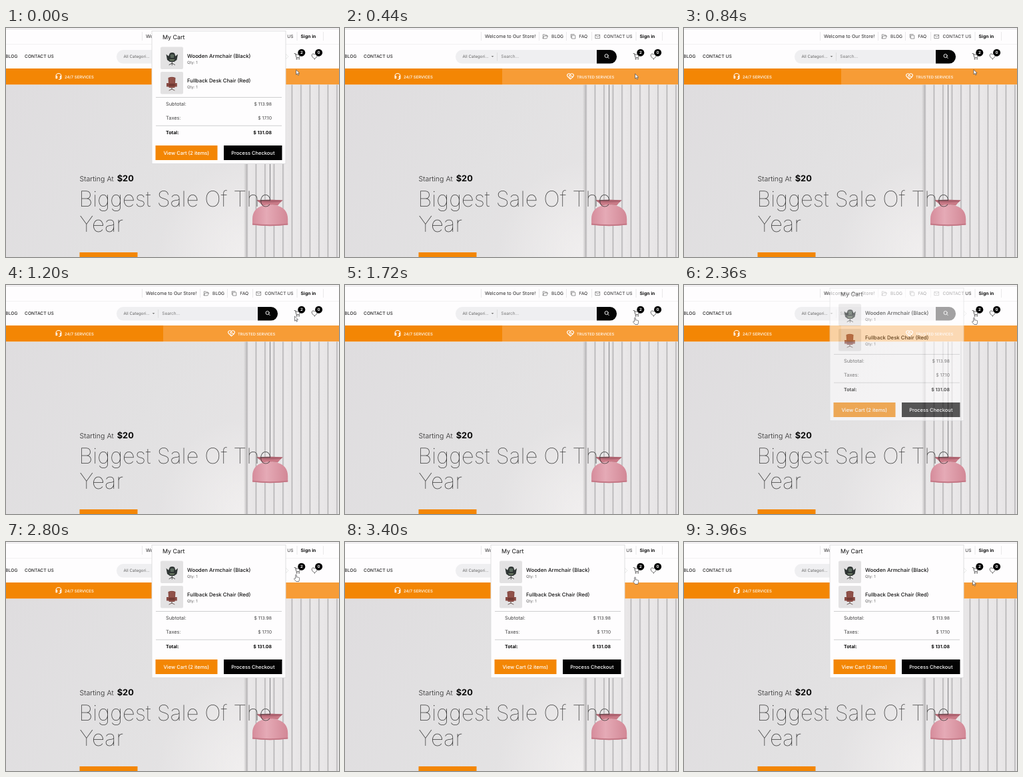
Animation, 500 px wide and 345 px high, one loop 4 s. Source, as an HTML page:

```html
<!DOCTYPE html>
<html lang="en">
<head>
<meta charset="utf-8">
<title>Store cart</title>
<style>
html, body { margin: 0; width: 100%; height: 100%; overflow: hidden; background: #fff; }
svg { display: block; width: 100vw; height: 100vh; }
text { font-family: Inter, "Open Sans", sans-serif; text-rendering: geometricPrecision; white-space: pre; }
.line { fill: none; stroke-linecap: round; stroke-linejoin: round; }
</style>
</head>
<body>
<svg id="stage" viewBox="0 0 500 345">
  <defs>
    <linearGradient id="wall" x2="1" y2=".25">
      <stop offset="0" stop-color="#dfdddf"/><stop offset=".5" stop-color="#e2e1e2"/><stop offset="1" stop-color="#e7e5e6"/>
    </linearGradient>
    <radialGradient id="glow" cx="1" cy="1" r="1">
      <stop offset="0" stop-color="#f1efef"/><stop offset="1" stop-color="#f1efef" stop-opacity="0"/>
    </radialGradient>
    <linearGradient id="slat">
      <stop offset="0" stop-color="#d9d7d8"/><stop offset=".25" stop-color="#eae8e9"/><stop offset="1" stop-color="#e6e4e5"/>
    </linearGradient>
    <linearGradient id="edge">
      <stop offset="0" stop-color="#bbb9ba" stop-opacity="0"/><stop offset="1" stop-color="#bbb9ba"/>
    </linearGradient>
    <linearGradient id="shade">
      <stop offset="0" stop-color="#d58c9b"/><stop offset=".4" stop-color="#e5aab6"/><stop offset="1" stop-color="#d28896"/>
    </linearGradient>
  </defs>

  <g id="page">
    <rect width="500" height="62" fill="#fefdfe"/>
    <path d="M0 1.5H500" stroke="#e2dfe2"/>
    <path d="M0 24.5H500" stroke="#f2f1f2"/>
    <path d="M204.5 6V19M291.5 6V19M332.5 6V19M370.5 6V19M437 6V19M476.5 6V19" stroke="#e4e3e5" stroke-width=".8"/>
    <g class="line" stroke="#555" stroke-width=".6">
      <path d="M297.3 15.5V9.8H299.8L300.7 10.8H303.2V12M297.3 15.5L298.9 12H304.6L303 15.5Z"/>
      <path d="M340.8 11.2H345.8V16H340.8ZM339.2 14.4V9.6H344.2"/>
      <path d="M376.2 10.2H382.6V15.6H376.2ZM376.2 10.8L379.4 13.4 382.6 10.8"/>
    </g>

    <rect x="166" y="33" width="242" height="20.6" rx="10" fill="#efeff1"/>
    <path d="M378 33H398A10 10 0 0 1 408 43V43.6A10 10 0 0 1 398 53.6H378Z" fill="#050505"/>
    <path d="M228.5 37V49.5" stroke="#d8d8da" stroke-width=".8"/>
    <path d="M219.7 42H223.3L221.5 43.9Z" fill="#777"/>
    <g class="line" stroke="#fff" stroke-width=".9">
      <circle cx="392.6" cy="42" r="2.6"/><path d="M394.6 44L396.3 45.7"/>
    </g>
    <g class="line" stroke="#333" stroke-width=".75">
      <path d="M433 38.5H434.6L435.9 44.5H440.6L441.5 40H435"/>
      <circle cx="436.5" cy="46.5" r=".6"/><circle cx="440" cy="46.5" r=".6"/>
      <path d="M463.3 46.7C460.8 44.6 459.2 43.1 459.2 41.1C459.2 38.7 462 38.1 463.3 40.2C464.6 38.1 467.4 38.7 467.4 41.1C467.4 43.1 465.8 44.6 463.3 46.7Z"/>
    </g>
    <circle cx="443.8" cy="37.2" r="5.5"/><circle cx="469.6" cy="37.2" r="5.5"/>

    <rect y="61" width="236" height="24.5" fill="#f38604"/>
    <rect x="236" y="61" width="264" height="24.5" fill="#f79c36"/>
    <g class="line" stroke="#fff" stroke-width="1.1">
      <path d="M75 73V72.5A4 4 0 0 1 83 72.5V73M75 72.6H76.6V75.8H75ZM81.4 72.6H83V75.8H81.4ZM82.6 76Q82.4 77.5 79.5 77.5"/>
      <path d="M338.5 77L334.3 73C332.3 70.5 335.5 67 338.5 70C341.5 67 344.7 70.5 342.7 73L340.7 75M338.5 70L336.6 72.2Q338 73.4 339.3 71.9L342 74.2M337 75.6L338.2 74.5M338.7 76.8L340 75.5"/>
    </g>

    <rect y="85.5" width="500" height="259.5" fill="url(#wall)"/>
    <rect x="230" y="200" width="132" height="145" fill="url(#glow)"/>
    <rect x="357" y="85.5" width="5" height="259.5" fill="url(#edge)"/>
    <g id="slats"></g>
    <path d="M396.5 85.5V259" stroke="#77777a" stroke-width=".9"/>
    <path d="M370 296.5V288C370 277 376 270 386 267.5Q396.500 264.500 407 267.500C417 270 423.200 277 423.200 288V296.500Q396.500 300 370 296.500Z" fill="url(#shade)"/>
    <path d="M370 294.500Q396.500 298 423.200 294.500V296.500Q396.500 300 370 296.500Z" fill="#c47886"/>
    <path d="M376.500 259.500Q396 258 415.500 259.500Q411 263.500 408 267.500Q396.500 265 385 267.500Q381.500 263.500 376.500 259.500Z" fill="#c97a87"/>
    <path d="M376.500 259.500Q396 258 415.500 259.500L412.500 262Q396 263.500 379.500 262Z" fill="#ad6370"/>
    <rect x="110.500" y="338" width="87" height="7" fill="#f38604"/>
  </g>

  <g id="popup">
    <path d="M420 39L424 43 420 47Z" fill="#fff" stroke="#ddd" stroke-width=".7"/>
    <rect x="219" y="4.500" width="201" height="200" fill="#fefdfe" stroke="#dcdcde" stroke-width=".9"/>
    <rect x="232" y="28.500" width="34" height="33.500" rx="2" fill="#e3e2e3"/>
    <rect x="232" y="66" width="34" height="33.500" rx="2" fill="#e3e2e3"/>
    <g>
      <path d="M240.500 39.500L244 42.500 246 38Q249.500 36 253 38L254.500 42.500 258 39.500 256.500 48 252.500 51H246L242 48Z" fill="#2e3433"/>
      <path d="M246.500 40.500Q249.500 38.500 252.500 40.500L251.800 45H247.200Z" fill="#59685c"/>
      <path d="M245 47H253.500L252 49.500H246.500Z" fill="#66745e"/>
      <path class="line" d="M249.300 51V53M249.300 53L245 55.500M249.300 53L253.500 55.500M249.300 53V56" stroke="#4b4b4b"/>
    </g>
    <g>
      <path d="M243.500 75Q249 72.500 254.500 75L254 83H256.800V88.500H254L253 90H245L244 88.500H241V83H244Z" fill="#884a43"/>
      <path d="M245.500 76.500H252.500M245.300 79H252.700M245.200 81.500H252.800" stroke="#a7665b" stroke-width=".7"/>
      <path d="M244.500 84.500H253.500V87H244.500Z" fill="#6c352f"/>
      <path class="line" d="M249 90V92M249 92L245 94M249 92L253 94" stroke="#6d5c58"/>
    </g>
    <path d="M225 104.500H414M225 147.200H414" stroke="#c9c9cb" stroke-width=".9"/>
    <rect x="224.500" y="177" width="93" height="22" fill="#f38604"/>
    <rect x="327" y="177" width="87.500" height="22" fill="#030303"/>
  </g>

  <g id="cursor" fill="#fff" stroke="#45454a" stroke-width=".7" stroke-linejoin="round">
    <path id="arrow" d="M0 0V7.200L1.700 5.700 2.900 8.300 4.100 7.700 2.900 5.200H5.200Z"/>
    <path id="hand" d="M2 6V1Q2 0 2.800 0T3.600 1V4Q4.400 3.300 5.100 4.200Q5.900 3.500 6.600 4.500Q7.800 4.100 7.900 5.500V7.500L7 10.500H3L.2 7.200Q-.4 5.800 .8 5.600Z"/>
  </g>
</svg>
<script>
const LOOP = 4000, STEP = 40;
const $ = id => document.getElementById(id);

function add(parent, tag, attrs, text = "") {
  const el = document.createElementNS($("stage").namespaceURI, tag);
  for (const key in attrs) el.setAttribute(key, attrs[key]);
  el.textContent = text;
  $(parent).append(el);
}

function label(parent, text, x, y, size, weight = 400, fill = "#2a2a2a", anchor = "start") {
  add(parent, "text", { x, y, "font-size": size, "font-weight": weight, fill, "text-anchor": anchor }, text);
}

for (let i = 0; i < 11; i++) {
  const x = 361.3 + i * 13.5;
  add("slats", "rect", { x, y: 85.5, width: 13.6, height: 259.5, fill: "url(#slat)" });
  add("slats", "rect", { x, y: 85.5, width: 1.2, height: 259.5, fill: "#b0aeb0" });
}

label("page", "Welcome to Our Store!", 210, 15.2, 7.15);
label("page", "BLOG", 310, 15.2, 6.7);
label("page", "FAQ", 351.3, 15.2, 6.7);
label("page", "CONTACT US", 388.5, 15.2, 6.6);
label("page", "Sign in", 442.5, 15.2, 6.9, 700, "#111");
label("page", "BLOG", -0.7, 45.2, 6.7, 500);
label("page", "CONTACT US", 28, 45.2, 6.7, 500);
label("page", "All Categori...", 176.5, 45.3, 6.2, 400, "#666");
label("page", "Search...", 234.3, 45.3, 6.4, 400, "#777");
label("page", "2", 443.8, 39.3, 6, 700, "#fff", "middle");
label("page", "0", 469.6, 39.3, 6, 700, "#fff", "middle");
label("page", "24/7 SERVICES", 88, 75.5, 6, 500, "#fff");
label("page", "TRUSTED SERVICES", 348, 75.5, 5.75, 500, "#fff");
label("page", "Starting At", 110.5, 231, 10.6, 300);
label("page", "$20", 166.7, 231, 12.8, 700, "#080808");
label("page", "Biggest Sale Of The", 109.5, 269, 32.5, 100, "#333");
label("page", "Year", 110.3, 306.5, 33, 100, "#333");

label("popup", "My Cart", 235, 16.8, 8.9, 400, "#111");
label("popup", "Wooden Armchair (Black)", 272, 45, 7.8, 500, "#111");
label("popup", "Qty: 1", 272, 53.8, 5.9, 400, "#666");
label("popup", "Fullback Desk Chair (Red)", 272, 82.3, 7.75, 500, "#111");
label("popup", "Qty: 1", 272, 91.3, 5.9, 400, "#666");
[["Subtotal:", "$ 113.98", 117, 400], ["Taxes:", "$ 17.10", 138, 400], ["Total:", "$ 131.08", 160, 700]]
  .forEach(([name, sum, y, weight]) => {
    const fill = weight > 400 ? "#0c0c0c" : "#444";
    label("popup", name, 240, y, weight > 400 ? 7.1 : 7.4, weight, fill);
    label("popup", sum, 399, y, 6.9, weight, fill, "end");
  });
label("popup", "View Cart (2 items)", 270.8, 190.6, 7.5, 500, "#fff", "middle");
label("popup", "Process Checkout", 370.8, 190.6, 7.5, 500, "#fff", "middle");

// cubic-bezier(.25, .1, .25, 1), solved for x by bisection
function ease(x) {
  if (x <= 0) return 0;
  if (x >= 1) return 1;
  const bez = (a, b, s) => 3 * a * s * (1 - s) ** 2 + 3 * b * s * s * (1 - s) + s ** 3;
  let lo = 0, hi = 1;
  for (let i = 0; i < 20; i++) {
    const mid = (lo + hi) / 2;
    if (bez(.25, .25, mid) < x) lo = mid; else hi = mid;
  }
  return bez(.1, 1, lo);
}

// time, x, y of the pointer
const path = [
  [0, 435.6, 63], [320, 435.6, 69], [720, 435.6, 69], [1120, 433.4, 48], [1200, 433.4, 47],
  [1400, 436, 45], [1640, 432.7, 49], [2840, 432.7, 49], [3200, 432.7, 53],
  [3440, 432.7, 53], [3720, 433.4, 58], [4000, 433.4, 58]
];

function pointer(t) {
  const i = path.findIndex(p => p[0] > t);
  const [t0, x0, y0] = path[i - 1], [t1, x1, y1] = path[i];
  const k = (t - t0) / (t1 - t0);
  return [x0 + (x1 - x0) * k, y0 + (y1 - y0) * k];
}

function draw(t) {
  const shown = t < 2000 ? 1 - ease((t - 80) / 300) : ease((t - 2250) / 300);
  $("popup").setAttribute("opacity", shown);
  const [x, y] = pointer(t), onCart = t >= 1280 && t < 3640;
  $("cursor").setAttribute("transform", `translate(${x} ${y})`);
  $("hand").setAttribute("visibility", onCart ? "visible" : "hidden");
  $("arrow").setAttribute("visibility", onCart ? "hidden" : "visible");
}

function tick() {
  draw(Math.floor(performance.now() % LOOP / STEP) * STEP);
  requestAnimationFrame(tick);
}
tick();
</script>
</body>
</html>
```
